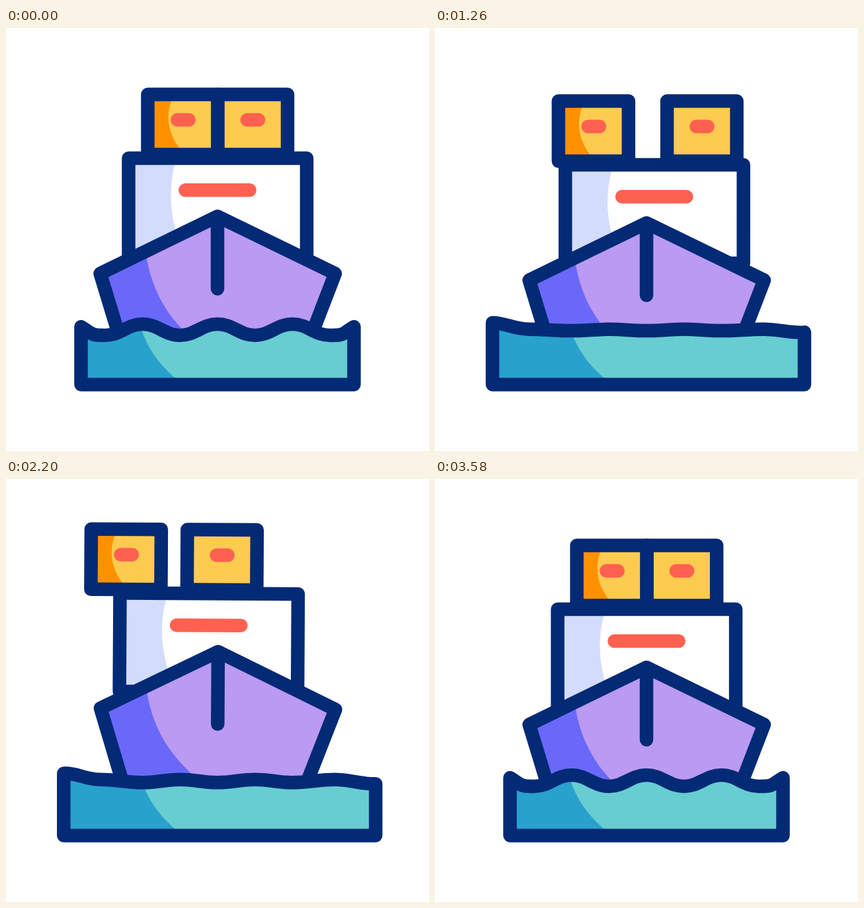
Animation of 640x640 px, one loop 3.6 s. Source, as an HTML page:

```html
<!DOCTYPE html>
<html lang="en">
<head>
<meta charset="utf-8">
<title>Ship on waves</title>
<style>
  html, body { margin: 0; width: 100%; height: 100%; overflow: hidden; background: #fff; }
  svg { display: block; width: 100vw; height: 100vh; }
  .ink, .tag, .drop { fill: none; stroke-width: 20.5; stroke-linecap: round; stroke-linejoin: round; }
  .ink { stroke: #032a75; }
  .tag { stroke: #ff6150; }
  .drop { stroke: #67cdd1; }
  .cargo { fill: #fdcb50; }
</style>
</head>
<body>
<svg viewBox="0 0 640 640">
  <defs>
    <clipPath id="hullClip"><path d="M320 285L498 371.5L448.5 500H181.6L142.5 371.5Z"/></clipPath>
    <clipPath id="seaClip"><path class="sea"/></clipPath>
  </defs>

  <g id="ship">
    <g id="left">
      <path class="cargo" d="M214.5 100.5h106v91h-106z"/>
      <path fill="#ff9100" d="M214.5 100.5H254C240 130 243 160 268 189V191.5H214.5Z"/>
      <path class="ink" d="M214.5 100.5h106v91h-106z"/>
      <path class="tag" d="M259.3 139h17.4"/>
    </g>
    <g id="right">
      <path class="cargo" d="M320.5 100.5h105.5v91h-105.5z"/>
      <path class="ink" d="M320.5 100.5h105.5v91h-105.5z"/>
      <path class="tag" d="M364.7 139h17.4"/>
    </g>
    <g id="cabin">
      <path fill="#fff" d="M185.5 197H455V346H185.5Z"/>
      <path fill="#d3dcfc" d="M185.5 197H258C247 232 246 270 258 310V346H185.5Z"/>
      <path class="ink" d="M185.5 197H455V346H185.5Z"/>
      <path class="tag" d="M271.3 245.3h97.4"/>
    </g>
    <g clip-path="url(#hullClip)">
      <path fill="#ba9af2" d="M130 280H510V510H130Z"/>
      <path fill="#6a68f9" d="M130 330H210.5C217 395 245 440 290 478L300 510H130Z"/>
    </g>
    <path class="ink" d="M320 285L498 371.5L448.5 500H181.6L142.5 371.5ZV394.5"/>
  </g>

  <path class="sea" fill="#67cdd1"/>
  <path clip-path="url(#seaClip)" fill="#28a1cd" d="M60 430H198C207 477 230 509 260 533V545H60Z"/>
  <path class="sea ink"/>
  <g id="spray"></g>
</svg>

<script>
const LOOP = 3600;
const $ = id => document.getElementById(id);
const mix = (a, b, k) => a + (b - a) * k;
const clamp = v => Math.min(1, Math.max(0, v));
const ease = p => (1 - Math.cos(Math.PI * clamp(p))) / 2;

// Starts and ends the loop at rest, easing through [time, value] keys
function track(...keys) {
  const all = [[0, 0], ...keys, [LOOP, 0]];
  return t => {
    const i = all.findIndex(([end]) => end > t);
    const [t0, a] = all[i - 1], [t1, b] = all[i];
    return mix(a, b, ease((t - t0) / (t1 - t0)));
  };
}

// One rocking cycle: up, hold, down, hold, up, rest
const sway = (size, up, fall, down, rise, top) =>
  track([up, size], [fall, size], [down, -size], [rise, -size], [top, size]);

const tilt = sway(7.5, 735, 735, 1788, 1788, 2592);
const heave = track([920, 20], [2010, -24.8], [3430, 0]);
const slides = {
  cabin: sway(22, 900, 1000, 1810, 1940, 2900),
  right: sway(66, 900, 980, 1790, 1980, 2900),
  left: track([958, 2], [1850, -113], [1940, -113], [2860, 24])
};
const swell = track([940, 1], [1670, 0], [2547, 1]);
const spread = track([1000, 29.5], [2400, 29.5]);

// A row of crests and troughs that swap places as the swell goes by
function seaPath(t) {
  const k = swell(t), w = spread(t);
  const xl = 113.5 - w + 5 * k, xr = 526.5 + w + 5 * k;
  const yl = mix(452, 442, k), yr = mix(452, 466, k);
  const crest = mix(448, 465, k), trough = mix(465, 449.5, k);
  let d = `M${xl} ${yl}C${xl + 18} ${yl + mix(11, -8, k)} `;
  for (let i = -3; i <= 3; i++) {
    const x = 320 + 56.67 * i + (Math.abs(i) === 3 ? Math.sign(i) * w / 4 : 0);
    const y = i % 2 ? trough : crest;
    d += `${x - 23} ${y} ${x} ${y}C${x + 23} ${y} `;
  }
  return d + `${xr - 18} ${yr + mix(11, -4, k)} ${xr} ${yr}V539.5H${xl}Z`;
}

const drops = [];
function addDrop(start, x, y, angle, from, to) {
  const el = document.createElementNS("http://www.w3.org/2000/svg", "path");
  el.setAttribute("class", "drop");
  $("spray").append(el);
  const a = angle * Math.PI / 180;
  const at = p => `${x + Math.cos(a) * mix(from, to, p)} ${y + Math.sin(a) * mix(from, to, p)}`;
  drops.push({ el, start, at });
}

// Three drops fanning out from the bow; side is 1 for right, -1 for left
function splash(start, x, y, side, turn) {
  for (let i = -1; i <= 1; i++) {
    const n = Math.abs(i), angle = turn + 41 * i;
    addDrop(start + 20 * n, x, y, side > 0 ? angle : 180 - angle, 50 + 12 * n, 88 + 5 * n);
  }
}

splash(624, 478, 381, 1, 6);
splash(1474, 175, 434, -1, 16);
splash(2705, 478, 381, 1, 6);
for (let i = 0; i < 2; i++) addDrop(1476 + 86 * i, 408 + 26 * i, 131 - 58 * i, 169.5, 0, 58);

// The tip shoots out first, then the tail catches up
function drawDrop({ el, start, at }, t) {
  const age = t - start;
  const on = age > 0 && age < 245;
  el.style.display = on ? "" : "none";
  if (on) el.setAttribute("d", `M${at(clamp((age - 110) / 135))}L${at(clamp(age / 110))}`);
}

const seas = document.querySelectorAll(".sea");
function draw() {
  const t = performance.now() % LOOP;
  $("ship").setAttribute("transform", `translate(0 ${heave(t)}) rotate(${tilt(t)} 320 450)`);
  for (const id in slides) $(id).setAttribute("transform", `translate(${slides[id](t)} 0)`);
  const d = seaPath(t);
  seas.forEach(el => el.setAttribute("d", d));
  drops.forEach(drop => drawDrop(drop, t));
  requestAnimationFrame(draw);
}
draw();
</script>
</body>
</html>
```
